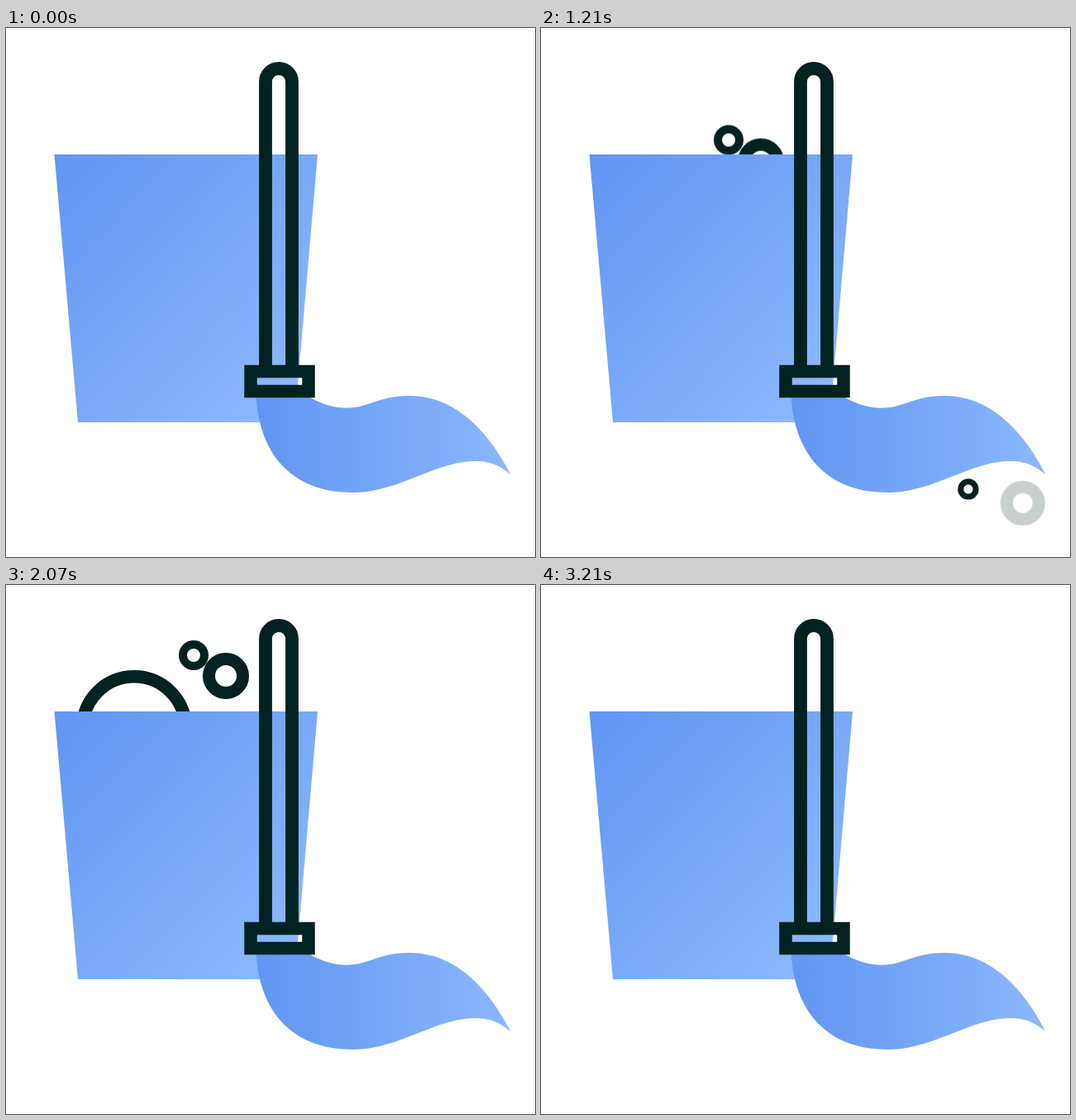
An HTML page without scripts that plays this animation: 640 by 640 pixels, repeating every 3.57 s.

```html
<!DOCTYPE html>
<html lang="en">
<head>
<meta charset="utf-8">
<title>Mop and bucket</title>
<style>
  html, body { margin: 0; width: 100%; height: 100%; overflow: hidden; background: #fff; }
  svg { display: block; width: 100%; height: 100%; }
  .ink { fill: none; stroke: #022221; }
  .anim { animation: 3570ms linear infinite both; }

  .bucket { transform-origin: 218px 477px; animation-name: wobble; animation-timing-function: ease-in-out; }
  .puff { animation-name: puff; }
  .late { animation-delay: 350ms; }
  .small { animation-name: rise-small; }
  .mid { animation-name: rise-mid; }
  .big { animation-name: rise-big; }

  @keyframes wobble {
    0%, 25.2%, 100% { transform: rotate(0deg); }
    8.12% { transform: rotate(-3deg); }
    16.8% { transform: rotate(3deg); }
  }
  @keyframes puff {
    0%, 6.7% { transform: scale(0); }
    10.08% { transform: scale(.157); }
    15.97% { transform: scale(.39); }
    24.09% { transform: scale(.686); }
    27% { transform: scale(.79); opacity: 1; }
    31.93% { transform: scale(.93); }
    35.85%, 100% { transform: scale(1); opacity: 0; }
  }
  @keyframes rise-small {
    0% { transform: translateY(190px); }
    15.1% { transform: translateY(174px); }
    24.1% { transform: translateY(156px); }
    31.9% { transform: translateY(140px); }
    42% { transform: translateY(117.5px); }
    47.9% { transform: translateY(105px); }
    58% { transform: translateY(85px); }
    66.1% { transform: translateY(72.5px); }
    70.6% { transform: translateY(66px) scale(1); opacity: 1; }
    79.3%, 100% { transform: translateY(66px) scale(1.5); opacity: 0; }
  }
  @keyframes rise-mid {
    0% { transform: translateY(200px); }
    22% { transform: translateY(187px); }
    42% { transform: translateY(144.3px); }
    58% { transform: translateY(110px) scale(1); opacity: 1; }
    66.5%, 100% { transform: translateY(104.2px) scale(1.51); opacity: 0; }
  }
  @keyframes rise-big {
    0% { transform: translateY(250px); }
    28% { transform: translateY(239px); }
    42% { transform: translateY(208px); }
    47.9% { transform: translateY(195px); }
    58% { transform: translateY(173px); }
    66.1% { transform: translateY(157px); }
    81% { transform: translateY(132px) scale(1); opacity: 1; }
    89.6%, 100% { transform: translateY(132px) scale(1.18); opacity: 0; }
  }
</style>
</head>
<body>
<svg viewBox="0 0 640 640">
  <defs>
    <linearGradient id="pail" x1="0" y1=".05" x2=".85" y2=".9">
      <stop offset="0" stop-color="#6196f3"/>
      <stop offset="1" stop-color="#8ab8fd"/>
    </linearGradient>
    <linearGradient id="hair">
      <stop offset="0" stop-color="#6196f3"/>
      <stop offset="1" stop-color="#8ab8fd"/>
    </linearGradient>
    <circle id="drop" cx="20.5" cy="20.5" r="20.2" stroke-width="15.6"/>
  </defs>

  <!-- bubbles rising from behind the bucket's rim -->
  <g class="ink">
    <g transform="translate(155 0)"><circle class="anim big" r="62.2" stroke-width="15.5"/></g>
    <g transform="translate(266 0)"><circle class="anim mid" r="20.5" stroke-width="15"/></g>
    <g transform="translate(227 0)"><circle class="anim small" r="13" stroke-width="10"/></g>
  </g>

  <path class="anim bucket" fill="url(#pail)" d="M58.5 153H377L349 477H87Z"/>

  <!-- mop -->
  <path fill="url(#hair)" d="M302.500 440C304 505 337 562 420 562C475 562 520 524 568 524C587 524 600 531 610.500 540.500C584 488 544 445 488 445C467 445 452 450 441 454C420 462 396 463 368 447V440Z"/>
  <path class="ink" stroke-width="15.800" d="M314 412V65a16 16 0 0 1 32 0V412"/>
  <rect class="ink" x="296" y="415.500" width="70" height="24" stroke-width="15.500"/>

  <!-- bubbles on the floor -->
  <g class="ink">
    <g transform="translate(563 555)"><g class="anim puff"><use href="#drop"/></g></g>
    <g transform="translate(507.600 548.600) scale(.66)"><g class="anim puff late"><use href="#drop"/></g></g>
  </g>
</svg>
</body>
</html>
```
